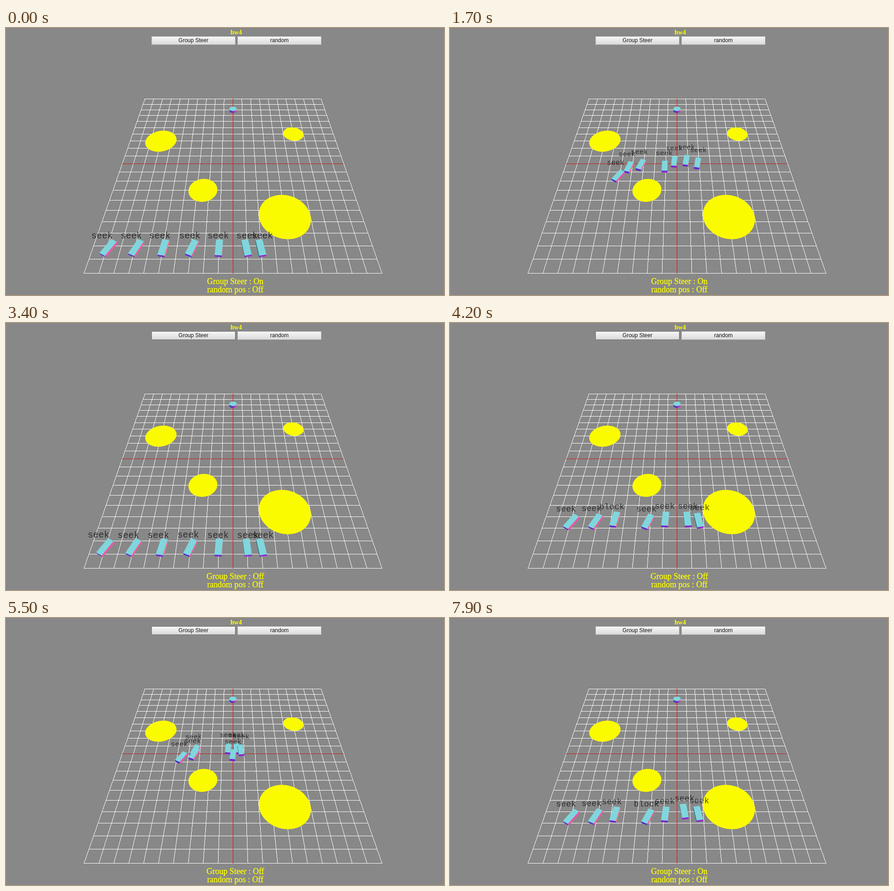
An HTML page with a canvas that plays this animation: 958x585 px, repeating every 8000 ms.

```html
<!DOCTYPE html>
<html lang="en">
<head>
<meta charset="utf-8">
<title>hw4</title>
<style>
html, body { margin: 0; width: 100%; height: 100%; overflow: hidden; background: #888; }
canvas { position: absolute; left: 0; top: 0; }
.text { position: absolute; width: 200px; color: #ff0; text-align: center; white-space: pre;
  font: 18px/18px "Liberation Serif", "Times New Roman", serif; }
#title { left: 403.5px; top: 3px; font-size: 14px; line-height: 14px; font-weight: bold; }
#status { left: 401.5px; top: 546px; height: 36px; -webkit-text-stroke: .3px #ff0; }
.button { position: absolute; top: 18px; left: 318px; width: 184px; height: 19px; box-sizing: border-box;
  border: 1px solid #a9a9a9; background: linear-gradient(#f6f6f6, #dadada); color: #111; text-align: center;
  font: 12px/17px "Liberation Sans", Arial, sans-serif; }
#random { left: 506px; }
</style>
</head>
<body>
<canvas id="stage" width="958" height="585"></canvas>
<div class="text" id="title">hw4</div>
<div class="button" id="steer">Group Steer</div>
<div class="button" id="random">random</div>
<div class="text" id="status"></div>
<script>
const stage = document.getElementById('stage');
const steer = document.getElementById('steer');
const status = document.getElementById('status');
const floor = stage.cloneNode();
let ctx = floor.getContext('2d');

// Camera looking at the origin; one world unit is one grid cell.
const DIST = 26.3, SIN = 0.737, COS = 0.676, FOCAL = 637;
const CAM = { x: 0, z: DIST * COS };
const GOAL = -8, LOOP = 8000, RUN = 3700, LEAD = 400;
const BOX = { l: 0.6, w: 0.25, h: 0.125 };

const depth = (y, z) => DIST - y * SIN - z * COS;
const project = (x, y, z) => {
  const k = FOCAL / depth(y, z);
  return [496.5 + x * k, 297.5 + (z * SIN - y * COS) * k];
};

// Keyframes of a run: [time, xs, zs], one entry per agent.
const startX = [-9, -7, -5, -3, -1, 1, 2];
const flat = z => startX.map(() => z);
const early = [
  [0, startX, flat(8.52)],
  [400, [-8.87, -6.89, -4.95, -2.92, -1, 0.95, 1.98], flat(8.17)]
];
const near = [-7.95, -6.13, -4.7, -2.19, -0.88];
const nearZ = [6.47, 6.43, 6.25, 6.45, 6.24];
const spread = [2800, [-3.11, -3, -1.82, -0.97, 0, 1.24, 2.2], [-2.35, -4.13, -4.4, -4.4, -5, -5.1, -4.75]];
const bunch = [2200, [-4.6, -3.5, -3.45, 0, -0.44, 0.32, 0.71], [0.44, 0.08, -0.42, 0.15, -0.66, -0.66, -0.43]];
const approach = (time, f) => [time, bunch[1].map(x => x * (1 - f)), bunch[2].map(z => z + (GOAL - z) * f)];

const grouped = [
  ...early,
  [900, [...near, 0.54, 1.6], [...nearZ, 5.99, 6.2]],
  [1400, [-6.99, -5.39, -4.44, -1.44, -0.61, 0.35, 1.31], [4.75, 4.54, 4.29, 4.6, 4.14, 3.95, 4.23]],
  spread,
  [3600, spread[1].map(x => x * 0.4), spread[2].map(z => z - 4.3)]
];
const alone = [
  ...early,
  [900, [...near, 0.78, 1.63], [...nearZ, 6.24, 6.35]],
  bunch, approach(3000, 0.62), approach(3600, 0.85)
];

// Cubic through the keyframes, starting from rest.
function sample(keys, axis, i, time) {
  const last = keys.length - 1;
  const value = k => keys[k][axis][i];
  const gap = k => keys[k + 1][0] - keys[k][0];
  const rate = k => (value(k + 1) - value(k)) / gap(k);
  const slope = k => {
    if (k === 0) return 0;
    if (k === last) return rate(k - 1);
    return (rate(k - 1) * gap(k) + rate(k) * gap(k - 1)) / (gap(k) + gap(k - 1));
  };
  let k = 0;
  while (k < last - 1 && time > keys[k + 1][0]) k++;
  const span = gap(k), u = (time - keys[k][0]) / span, v = 1 - u;
  return v * v * (1 + 2 * u) * value(k) + u * u * (3 - 2 * u) * value(k + 1)
    + span * u * v * (v * slope(k) - u * slope(k + 1));
}

function fill(points, color) {
  ctx.beginPath();
  points.forEach(p => ctx.lineTo(...p));
  ctx.closePath();
  ctx.fillStyle = color;
  ctx.fill();
}

// Colour of a surface from its normal as seen by the camera.
function shade(x, y, z) {
  const c = n => Math.round(127.5 + 127.5 * n);
  return `rgb(${c(x)},${c(y * COS - z * SIN)},${c(y * SIN + z * COS)})`;
}

// Upright solid standing on an outline that runs round [x, z] points.
function solid(outline, cx, cz) {
  outline.forEach((a, i) => {
    const b = outline[(i + 1) % outline.length];
    let nx = b[1] - a[1], nz = a[0] - b[0];
    const mx = (a[0] + b[0]) / 2, mz = (a[1] + b[1]) / 2;
    const len = Math.hypot(nx, nz) * Math.sign(nx * (mx - cx) + nz * (mz - cz));
    nx /= len;
    nz /= len;
    if (nx * (CAM.x - mx) + nz * (CAM.z - mz) <= 0) return;
    fill([project(a[0], BOX.h, a[1]), project(b[0], BOX.h, b[1]),
      project(b[0], -BOX.h, b[1]), project(a[0], -BOX.h, a[1])], shade(nx, 0, nz));
  });
  fill(outline.map(([x, z]) => project(x, BOX.h, z)), shade(0, 1, 0));
}

function ring(x, z, r, n) {
  return Array.from({ length: n }, (_, i) => {
    const a = i / n * Math.PI * 2;
    return [x + r * Math.cos(a), z + r * Math.sin(a)];
  });
}

function vehicle({ x, z, angle }) {
  const c = Math.cos(angle), s = Math.sin(angle);
  const corners = [[1, 1], [1, -1], [-1, -1], [-1, 1]].map(([a, b]) =>
    [x + a * BOX.l * c - b * BOX.w * s, z + a * BOX.l * s + b * BOX.w * c]);
  solid(corners, x, z);
}

function label(x, z, text) {
  const y = 1.44;
  ctx.font = `${385 / depth(y, z)}px "Courier New", "Liberation Mono", monospace`;
  ctx.textAlign = 'center';
  ctx.fillStyle = 'rgba(0,0,0,.67)';
  ctx.fillText(text, ...project(x, y, z));
}

// Hard-edged line, one pixel per row.
function column(x, color) {
  const [x0, y0] = project(x, 0, -10), [x1, y1] = project(x, 0, 10);
  ctx.fillStyle = color;
  for (let y = Math.floor(y0); y <= y1; y++)
    ctx.fillRect(Math.floor(x0 + (x1 - x0) * (y + 0.5 - y0) / (y1 - y0)), y, 1, 1);
}

function row(z, color) {
  const [left, y] = project(-10, 0, z), right = project(10, 0, z)[0];
  ctx.fillStyle = color;
  ctx.fillRect(Math.floor(left), Math.floor(y), Math.round(right - left), 1);
}

function drawFloor() {
  for (let i = -10; i <= 10; i++) {
    if (!i) continue;
    row(i, '#fff');
    column(i, '#fff');
  }
  row(0, '#c81e1e');
  column(0, '#f00');
  for (const [x, z, r] of [[-7, -3, 1.5], [6, -4, 1], [-2.5, 3, 1.2], [4, 5.5, 2]])
    fill(ring(x, z, r, 72).map(p => project(p[0], 0.04, p[1])), '#fbfb00');
}

function isBlocked(i, time, group) {
  if (!group) return i === 2 && time > 700 && time < 1400;
  return time < 1600 && (i === 2 && time > 1100 || i === 3 && time > 800);
}

function draw(t) {
  const run = Math.floor((t + LEAD) / RUN), time = (t + LEAD) % RUN;
  const group = run !== 1, keys = group ? grouped : alone;
  const on = t < 2750 || t >= 7500;

  ctx.clearRect(0, 0, 958, 585);
  ctx.drawImage(floor, 0, 0);

  const agents = startX.map((_, i) => {
    const x = sample(keys, 1, i, time), z = sample(keys, 2, i, time);
    // While picking up speed an agent already points along its coming path.
    const ahead = Math.max(400, time);
    const turn = axis => sample(keys, axis, i, ahead + 20) - sample(keys, axis, i, ahead - 20);
    const angle = time ? Math.atan2(turn(2), turn(1)) : Math.atan2(-z, -x);
    return { x, z, angle, text: isBlocked(i, time, group) ? 'block' : 'seek' };
  });
  // Right after a restart the last two bodies still sit at the origin.
  const bodies = agents.map((a, i) => !time && i > 4 ? { x: 0, z: 0, angle: 0 } : a);
  [...bodies, { x: 0, z: GOAL, goal: true }].sort((a, b) => a.z - b.z)
    .forEach(b => b.goal ? solid(ring(0, GOAL, 0.4, 32), 0, GOAL) : vehicle(b));
  agents.forEach(a => label(a.x, a.z, a.text));

  status.textContent = `Group Steer : ${on ? 'On' : 'Off'}\nrandom pos : Off`;
  steer.style.borderColor = on ? '#a9a9a9' : '#757575';
}

drawFloor();
ctx = stage.getContext('2d');
const begin = performance.now();
function tick() {
  const t = (performance.now() - begin) % LOOP;
  draw(Math.floor(t / 100) * 100);
  requestAnimationFrame(tick);
}
tick();
</script>
</body>
</html>
```
